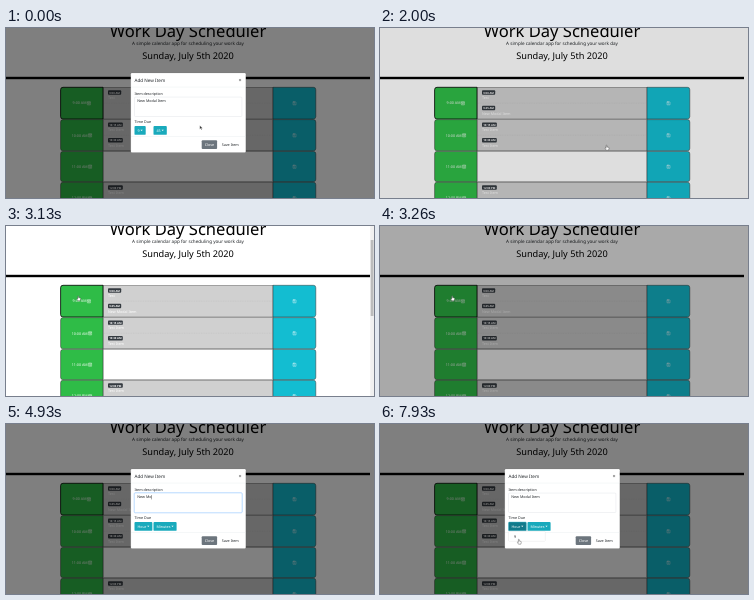
Recreate the animation shown at these times as an HTML page. Size 368 px wide and 170 px high, loop 8 s.

```html
<!DOCTYPE html>
<html lang="en">
<head>
<meta charset="utf-8">
<title>Work Day Scheduler</title>
<style>
  html, body { margin: 0; width: 100%; height: 100%; overflow: hidden; background: #fff; }
  svg { display: block; width: 368px; height: 170px; }
  text { font: 3.68px "Noto Sans", "Open Sans", sans-serif; text-rendering: geometricPrecision; fill: #212529; white-space: pre; }
  .mid { text-anchor: middle; }
  .title { font-size: 16.56px; fill: #000; }
  .lead { font-size: 4.6px; }
  .date { font-size: 9.2px; fill: #000; }
  .badge { font-size: 2.76px; font-weight: 700; }
  .white { fill: #fff; }
  .close { font-size: 5.5px; font-weight: 700; fill: #777; }
  .icon { fill: none; stroke: #fff; stroke-width: .4; }
</style>
</head>
<body>
<svg viewBox="0 0 368 170">
  <text class="title mid" x="182" y="8.5">Work Day Scheduler</text>
  <text class="lead mid" x="182" y="17">A simple calendar app for scheduling your work day</text>
  <text class="date mid" x="182" y="30.5">Sunday, July 5th 2020</text>
  <rect y="48.8" width="364" height="2.4"/>
  <g id="rows"></g>
  <g id="scrollbar">
    <rect x="364.2" width="3.8" height="170" fill="#f0f0f0"/>
    <rect x="364.7" y="14" width="2.8" height="76" fill="#bcbcbc"/>
  </g>
  <rect id="backdrop" width="368" height="170"/>

  <g id="modal">
    <rect x="124.8" y="45.1" width="115" height="79.5" rx="1.1" fill="#fff" stroke="#000" stroke-opacity=".25" stroke-width=".25"/>
    <text class="lead" x="128.5" y="53.7">Add New Item</text>
    <text class="close mid" x="234" y="53.7">×</text>
    <path d="M125 59.1H239.6M125 108.5H239.6" stroke="#dee2e6" stroke-width=".3"/>
    <text x="128.5" y="66.6">Item description</text>
    <rect id="ring" x="128.1" y="68.7" width="108.2" height="20.2" rx="1.2" fill="none" stroke="#007bff" stroke-opacity=".25" stroke-width=".8"/>
    <rect id="area" x="128.5" y="69.1" width="107.4" height="19.4" rx=".9" fill="#fff" stroke-width=".3"/>
    <text id="typed" x="131.3" y="74.4" fill="#495057"></text>
    <rect id="caret" y="71" width=".4" height="4.4" fill="#333"/>
    <text x="128.5" y="95.4">Time Due</text>
    <g id="hour"></g>
    <g id="minute"></g>
    <rect x="195.7" y="112.3" width="15.4" height="8.7" rx=".9" fill="#6c757d"/>
    <text class="white mid" x="203.4" y="118">Close</text>
    <text class="mid" x="224.2" y="118">Save Item</text>
    <g id="menu">
      <rect x="128.5" y="107.3" width="36.8" height="10" rx=".9" fill="#fff" stroke="#000" stroke-opacity=".2" stroke-width=".25"/>
      <text x="134.1" y="113.6">9</text>
    </g>
  </g>

  <g id="cursor" stroke-width=".35" stroke-linejoin="round">
    <path id="arrow" d="M0 0V3.9L.95 3.05L1.6 4.5L2.2 4.2L1.55 2.85H2.8Z" fill="#222" stroke="#fff"/>
    <path id="hand" d="M-.4 0Q0-.4 .4 0V1.6L2.2 2Q2.6 2.2 2.5 3L2 4.8H-.3L-1.5 2.9Q-1.3 2.2-.4 2.9Z" fill="#fff" stroke="#222"/>
  </g>
</svg>
<script>
const LOOP = 8000;
const $ = id => document.getElementById(id);
const clamp = v => Math.min(1, Math.max(0, v));
const ramp = (t, from, length) => clamp((t - from) / length);
const smooth = p => p * p * (3 - 2 * p);
const show = (id, on) => $(id).setAttribute('visibility', on ? 'inherit' : 'hidden');
const mix = (a, b, p) => `rgb(${a.map((v, i) => Math.round(v + (b[i] - v) * p))})`;

const rows = [
  { top: 59.3, height: 31.7, label: '9:00 AM', items: [['9:00 AM', 'Test', 64.5], ['9:45 AM', 'New Modal Item', 80]] },
  { top: 91.6, height: 31.2, label: '10:00 AM', items: [['10:15 AM', 'Test Item', 96.6], ['10:30 AM', 'Test Item', 112.3]] },
  { top: 123.4, height: 30.3, label: '11:00 AM', items: [] },
  { top: 154.3, height: 31.7, label: '12:00 PM', items: [['12:00 PM', 'Test Item', 159.5]] }
];

function itemMarkup([time, name, y]) {
  const width = time.length > 7 ? 14.8 : 13.2;
  return `<g ${time === '9:45 AM' ? 'id="newItem"' : ''}>
    <rect x="102" y="${y - 2.2}" width="${width}" height="4.4" rx=".9" fill="#343a40"/>
    <text class="badge white mid" x="${102 + width / 2}" y="${y + 1}">${time}</text>
    <text class="white" x="102" y="${y + 6.6}">${name}</text></g>`;
}

function rowMarkup({ top, height: h, label, items }, index) {
  const y = top + h / 2, bottom = top + h;
  const edge = index ? '#333" stroke-width=".5' : '#000" stroke-width=".8';
  const iconX = label.length > 7 ? 82.6 : 81.4;
  const divider = items.length > 1
    ? `<path d="M98 ${y}H266" stroke="#aaa" stroke-width=".25" stroke-dasharray="1 .7"/>` : '';
  return `
    <rect x="97" y="${top}" width="170" height="${h}" fill="${items.length ? '#d0d0d0' : '#fff'}" stroke="#444" stroke-width=".4"/>
    ${divider}${items.map(itemMarkup).join('')}
    <path d="M97 ${top}H57Q54.6 ${top} 54.6 ${top + 2.4}V${bottom - 2.4}Q54.6 ${bottom} 57 ${bottom}H97Z" fill="#2fbc47" stroke="${edge}"/>
    <path d="M267 ${top}H307.4Q309.8 ${top} 309.8 ${top + 2.4}V${bottom - 2.4}Q309.8 ${bottom} 307.4 ${bottom}H267Z" fill="#13bdd1" stroke="#333" stroke-width=".5"/>
    <text class="white" x="${iconX - .9}" y="${y + 1.3}" text-anchor="end">${label}</text>
    <path class="icon" d="M${iconX} ${y - 1.5}h3v3.2h-3zm0 .8h3M${iconX + 1.5} ${y - .2}v1.5m-.8-.75h1.6"/>
    <path class="icon" d="M287 ${y - 1.5}h2.3l.7 .7v2.5h-3zm.6 0v1h1.4v-1m-1.2 2.2h1.2"/>`;
}
$('rows').innerHTML = rows.map(rowMarkup).join('');

function setDropdown(id, x, label, textWidth, active) {
  const key = label + active;
  if ($(id).dataset.key === key) return;
  $(id).dataset.key = key;
  const caretX = x + 3.9 + textWidth;
  $(id).innerHTML = `
    <rect x="${x}" y="98.1" width="${textWidth + 9.1}" height="8.7" rx=".9" fill="${active ? '#117a8b' : '#19aabc'}"
      ${active ? 'stroke="#3ab0c3" stroke-opacity=".5" stroke-width=".9"' : ''}/>
    <text class="white" x="${x + 2.95}" y="103.8">${label}</text>
    <path d="M${caretX} 101.8h2.2l-1.1 1.1z" fill="#fff"/>`;
}

// Times at which each typed character appears
const phrase = 'New Modal Item';
const keyTimes = [4060, 4330, 4460, 4600, 4730, 4930, 5000, 5060, 5260, 5400, 5600, 5670, 5730, 5930];
const SAVED = 1740, OPENED = 3160, FOCUSED = 3640, HOUR_CLICK = 7330;

const cursorPath = [
  [0, 193.8, 97.4], [50, 193.8, 97.4], [730, 226.5, 117.4], [2200, 226.5, 117.4], [3050, 72.2, 70],
  [6500, 72.2, 70], [7230, 137, 102], [7450, 137, 102], [7900, 138.8, 115.4]
];

function cursorAt(t) {
  const next = cursorPath.findIndex(k => k[0] > t);
  if (next < 0) return cursorPath.at(-1).slice(1);
  const [t0, x0, y0] = cursorPath[next - 1], [t1, x1, y1] = cursorPath[next];
  const p = smooth((t - t0) / (t1 - t0));
  return [x0 + (x1 - x0) * p, y0 + (y1 - y0) * p];
}

function drawModal(t) {
  const first = t < 2500;
  const opacity = first ? 1 - ramp(t, SAVED, 150) : ramp(t, OPENED + 150, 150);
  const slide = first ? 1 - (1 - ramp(t, SAVED, 300)) ** 2 : (1 - ramp(t, OPENED + 150, 300)) ** 2;
  $('modal').setAttribute('opacity', opacity);
  $('modal').setAttribute('transform', `translate(0 ${-11.5 * slide})`);

  const dim = first ? 1 - ramp(t, SAVED + 150, 150) : ramp(t, OPENED, 150);
  $('backdrop').setAttribute('opacity', dim / 2);
  show('scrollbar', t >= SAVED + 300 && t < OPENED);
  show('newItem', t >= SAVED);

  const typedCount = keyTimes.filter(k => k <= t).length;
  $('typed').textContent = first ? phrase : phrase.slice(0, typedCount);

  const focus = smooth(ramp(t, FOCUSED, 150)) * (1 - smooth(ramp(t, HOUR_CLICK, 150)));
  $('ring').setAttribute('opacity', focus);
  $('area').setAttribute('stroke', mix([206, 212, 218], [128, 189, 255], focus));

  const lastKey = typedCount ? keyTimes[typedCount - 1] : FOCUSED;
  show('caret', t >= FOCUSED && t < HOUR_CLICK && (t - lastKey) % 1000 < 500);
  $('caret').setAttribute('x', 131.3 + $('typed').getComputedTextLength());

  const open = t >= HOUR_CLICK;
  setDropdown('hour', 128.5, first ? '9' : 'Hour', first ? 2.1 : 8.75, open);
  setDropdown('minute', 147.5, first ? '45' : 'Minutes', first ? 4.2 : 14, false);
  show('menu', open);
}

function drawCursor(t) {
  const pointing = (t > 660 && t < 2230) || (t > 2830 && t < 3500) || t > 7130;
  $('cursor').setAttribute('transform', `translate(${cursorAt(t)})`);
  show('cursor', t < 3500 || t > 6500);
  show('hand', pointing);
  show('arrow', !pointing);
}

function frame() {
  const t = performance.now() % LOOP;
  drawModal(t);
  drawCursor(t);
  requestAnimationFrame(frame);
}
frame();
</script>
</body>
</html>
```
